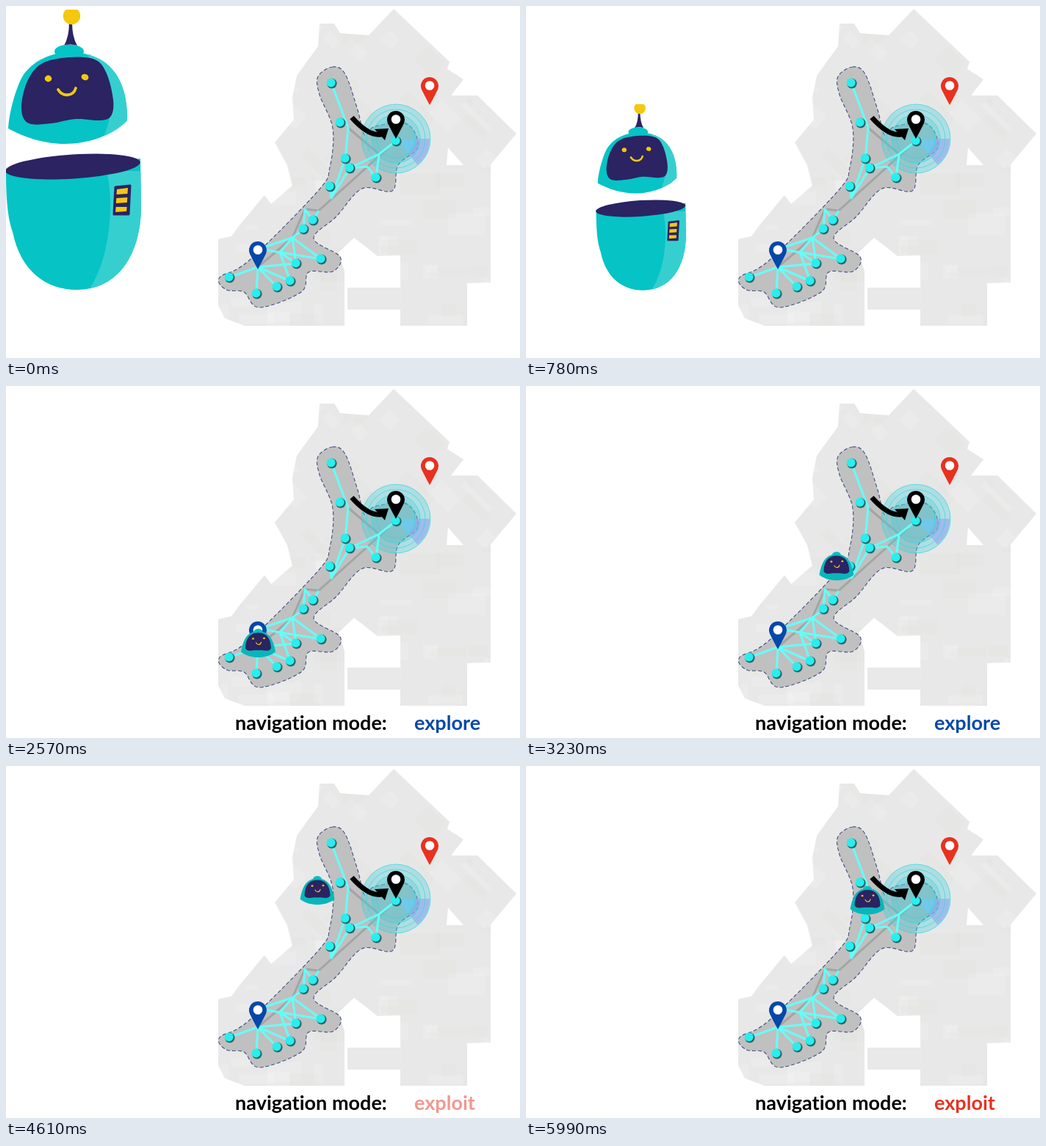
An HTML page with a canvas that plays this animation: 700x480 px, repeating every 8.06 s.

```html
<!DOCTYPE html>
<html lang="en">
<head>
<meta charset="utf-8">
<title>Robot navigation</title>
<style>
html, body { margin: 0; width: 100%; height: 100%; overflow: hidden; background: #fff; }
canvas { display: block; }
</style>
</head>
<body>
<canvas id="stage" width="700" height="480"></canvas>
<script>
const ctx = document.getElementById('stage').getContext('2d');
const LOOP = 8060, TAU = Math.PI * 2;
const TEAL = '#06c3c6', LIGHT = '#36cfd0', NAVY = '#2b2362', YELLOW = '#f3c80f';
const BLUE = '#0648a9', RED = '#e8311f', CYAN = '#66fdf8';

const building = [
  528,4, 604,76, 601,86, 623,100, 606,122, 642,122, 695,174, 660,216, 660,377, 628,378,
  628,436, 537,436, 537,340, 506,341, 474,316, 453,336, 461,362, 461,436, 325,436, 298,426,
  289,408, 289,318, 307,314, 318,299, 352,258, 361,270, 390,245, 383,217, 366,186, 392,155,
  390,125, 396,95, 425,55, 427,24, 447,24, 455,37, 494,40
];
const explored = [
  445,83, 425,96, 427,121, 445,167, 441,220, 425,252, 331,347, 291,370, 300,387, 324,390,
  345,411, 402,390, 412,363, 445,362, 455,342, 419,317, 450,287, 485,249, 526,252, 534,217,
  561,192, 546,161, 503,164, 488,175, 479,142, 462,93
];

// Capitals are stations of the graph, small letters are bare joints
const spots = {
  A: [443, 105], B: [455, 159], C: [462, 208], D: [468, 221], E: [441, 246],
  F: [504, 234], G: [418, 292], H: [405, 304], I: [429, 345], J: [395, 351],
  K: [387, 375], L: [369, 383], M: [341, 392], N: [304, 370], P: [531, 184],
  p: [466, 166], q: [443, 262], r: [492, 219], s: [508, 202], t: [426, 279],
  u: [407, 277], v: [390, 316], w: [373, 336], x: [345, 331], o: [343, 356], y: [520, 194]
};
const trails = ['ovuty', 'ps'];
const links = ['ApCqE', 'qDsP', 'DrFs', 'tGuHvI', 'xvJwK', 'Iwx', 'vw', 'NoM', 'LoK', 'Jo'];

const clamp = x => Math.max(0, Math.min(1, x));
const ramp = (t, a, b) => clamp((t - a) / (b - a));
const ease = x => x * x * (3 - 2 * x);
const mix = (a, b, p) => a + (b - a) * p;

function seeded(seed) {
  return () => (seed = seed * 16807 % 2147483647) / 2147483647;
}

function line(p, close) {
  ctx.beginPath();
  for (let i = 0; i < p.length; i += 2) ctx.lineTo(p[i], p[i + 1]);
  if (close) ctx.closePath();
}

// Closed Catmull-Rom curve through the points
function blob(p) {
  const n = p.length / 2;
  const at = i => { const k = (i + n) % n * 2; return [p[k], p[k + 1]]; };
  ctx.beginPath();
  ctx.moveTo(p[0], p[1]);
  for (let i = 0; i < n; i++) {
    const [a, b, c, d] = [at(i - 1), at(i), at(i + 1), at(i + 2)];
    ctx.bezierCurveTo(b[0] + (c[0] - a[0]) / 6, b[1] + (c[1] - a[1]) / 6,
      c[0] - (d[0] - b[0]) / 6, c[1] - (d[1] - b[1]) / 6, c[0], c[1]);
  }
  ctx.closePath();
}

function fill(color) { ctx.fillStyle = color; ctx.fill(); }

function stroke(color, width) {
  ctx.strokeStyle = color;
  ctx.lineWidth = width;
  ctx.stroke();
}

function oval(x, y, rx, ry, color, turn = 0) {
  ctx.beginPath();
  ctx.ellipse(x, y, rx, ry, turn, 0, TAU);
  fill(color);
}

function pin(x, y, color) {
  ctx.beginPath();
  ctx.arc(x, y, 12, Math.PI * 0.88, Math.PI * 0.12);
  ctx.quadraticCurveTo(x + 7, y + 13, x, y + 26);
  ctx.quadraticCurveTo(x - 7, y + 13, x - 11.2, y + 4.4);
  fill(color);
  oval(x, y - 0.5, 6.3, 6.3, '#fff');
}

function wedge(x, y, r, color) {
  ctx.beginPath();
  ctx.moveTo(x, y);
  ctx.arc(x, y, r, 0, Math.PI * 0.28);
  fill(color);
}

function radar(x, y) {
  oval(x, y, 47, 47, 'rgba(70,205,215,.36)');
  oval(x, y, 33, 33, 'rgba(60,185,195,.22)');
  wedge(x, y, 46, 'rgba(150,165,240,.6)');
  wedge(x, y, 27, 'rgba(70,235,250,.4)');
  for (let r = 47; r > 24; r -= 7) {
    ctx.beginPath();
    ctx.arc(x, y, r, 0, TAU);
    stroke('rgba(50,215,228,.7)', 1);
  }
}

function arrow() {
  ctx.beginPath();
  ctx.moveTo(471, 152);
  ctx.quadraticCurveTo(494, 178, 511, 175);
  stroke('#000', 7);
  line([502,168, 521,167, 516,183], true);
  fill('#000');
}

// Faint rooms: slanted in the upper half, upright in the lower
function rooms() {
  const rand = seeded(41);
  for (let i = 0; i < 90; i++) {
    const x = mix(290, 690, rand()), y = mix(10, 430, rand());
    ctx.save();
    ctx.translate(x, y);
    if (y < 200) ctx.rotate(Math.PI / 4);
    ctx.fillStyle = i % 2 ? 'rgba(255,255,255,.13)' : 'rgba(120,115,105,.025)';
    ctx.fillRect(0, 0, 10 + 45 * rand(), 5 + 25 * rand());
    ctx.restore();
  }
}

function route(names, color, width) {
  line([...names].flatMap(n => spots[n]));
  stroke(color, width);
}

function drawMap() {
  ctx.lineJoin = 'round';
  ctx.fillStyle = '#e9e9e9';
  ctx.fillRect(465, 384, 74, 30);
  line(building, true);
  fill('#e8e8e8');
  ctx.save();
  ctx.clip();
  rooms();
  ctx.restore();
  line([602,193, 623,217, 600,217], true);
  fill('#fff');

  blob(explored);
  fill('#c0c0c0');
  ctx.setLineDash([5, 3]);
  stroke('#405084', 1.1);
  ctx.setLineDash([]);
  for (const names of trails) route(names, '#a4a4a4', 3);
  radar(531, 181);
  for (const names of links) route(names, CYAN, 3);
  for (const [name, [x, y]] of Object.entries(spots)) {
    if (name > 'Z') continue;
    oval(x + 0.8, y + 0.6, 6.8, 6.8, '#23676c');
    oval(x - 0.4, y - 0.5, 6, 6, '#29eeee');
  }
  arrow();
  pin(343, 333, BLUE);
  pin(531, 155, '#000');
  pin(577, 109, RED);
}

function smile(x, y, w, h, width) {
  ctx.beginPath();
  ctx.moveTo(x - w, y);
  ctx.bezierCurveTo(x - w / 2, y + h, x + w * 0.7, y + h, x + w, y - h / 5);
  ctx.lineCap = 'round';
  stroke(YELLOW, width);
  ctx.lineCap = 'butt';
}

// Fills the current path and lights its right side
function shade(x, top, bulge, foot, bottom) {
  fill(TEAL);
  ctx.save();
  ctx.clip();
  ctx.beginPath();
  ctx.moveTo(x, top);
  ctx.bezierCurveTo(bulge, mix(top, bottom, 0.2), bulge, mix(top, bottom, 0.7), foot, bottom);
  ctx.lineTo(200, bottom);
  ctx.lineTo(200, top);
  fill(LIGHT);
  ctx.restore();
}

function head() {
  oval(86, 62, 20, 9.5, TEAL);
  ctx.beginPath();
  ctx.moveTo(3, 167);
  ctx.bezierCurveTo(4, 145, 14, 110, 23, 95);
  ctx.bezierCurveTo(36, 75, 60, 64, 86, 63);
  ctx.bezierCurveTo(137, 63, 166, 95, 165, 156);
  ctx.bezierCurveTo(146, 176, 113, 188, 80, 188);
  ctx.bezierCurveTo(50, 188, 23, 178, 3, 167);
  shade(98, 60, 152, 126, 190);
  blob([21,141, 28,105, 48,79, 85,70, 121,73, 137,92, 146,128, 143,150, 128,156, 95,154, 62,160, 31,160]);
  fill(NAVY);
  oval(57.5, 99, 4.8, 4.4, YELLOW);
  oval(107.5, 97, 5, 4.2, YELLOW, 0.3);
  smile(83, 114, 12, 10, 3.8);
}

function antenna() {
  ctx.beginPath();
  ctx.moveTo(86, 22);
  ctx.quadraticCurveTo(86, 42, 79, 54);
  ctx.quadraticCurveTo(88, 51, 97, 54);
  ctx.quadraticCurveTo(90, 42, 90, 22);
  fill(NAVY);
  ctx.save();
  ctx.beginPath();
  ctx.rect(70, 5, 40, 40);
  ctx.clip();
  oval(89.5, 13.5, 11.7, 11.7, YELLOW);
  ctx.restore();
}

function body() {
  ctx.beginPath();
  ctx.moveTo(0, 222);
  ctx.bezierCurveTo(0, 262, 2, 288, 9, 308);
  ctx.bezierCurveTo(20, 362, 55, 387, 96, 387);
  ctx.bezierCurveTo(152, 387, 184, 340, 184, 272);
  ctx.lineTo(183, 208);
  ctx.lineTo(90, 220);
  shade(137, 225, 146, 111, 390);
  oval(91, 219, 92, 16.5, NAVY, -0.065);
  line([149,247, 169,245, 167,284, 147,284], true);
  fill(NAVY);
  stroke(NAVY, 3);
  for (let i = 0; i < 3; i++) {
    const x = 151 - i * 0.7, y = 250 + i * 12;
    line([x, y, x + 15, y - 2 + i, x + 14.5, y + 6, x - 0.5, y + 7], true);
    fill(YELLOW);
  }
}

function robot() { antenna(); head(); body(); }

// Small explorer centred on the origin
function scout() {
  oval(0, -15, 6, 4.5, TEAL);
  ctx.beginPath();
  ctx.moveTo(-23.5, 12);
  ctx.bezierCurveTo(-20, -8, -13, -16, 0, -16);
  ctx.bezierCurveTo(13, -16, 20, -8, 23.5, 12);
  ctx.bezierCurveTo(12, 22, -12, 22, -23.5, 12);
  fill('#09b6ba');
  ctx.beginPath();
  ctx.moveTo(-17.5, 7);
  ctx.bezierCurveTo(-17, -7, -11, -14, 0, -14);
  ctx.bezierCurveTo(11, -14, 17, -7, 17.5, 7);
  ctx.bezierCurveTo(15, 13, 6, 9, 0, 10);
  ctx.bezierCurveTo(-6, 9, -15, 13, -17.5, 7);
  fill(NAVY);
  oval(-7, -6, 1.5, 1.3, YELLOW);
  oval(8, -6.5, 1.5, 1.3, YELLOW);
  smile(0.5, -0.5, 3.5, 3.5, 1.2);
}

function place(draw, x, y, scale, alpha = 1, cx = 0, cy = 0) {
  ctx.save();
  ctx.globalAlpha = alpha;
  ctx.translate(x, y);
  ctx.scale(scale, scale);
  ctx.translate(-cx, -cy);
  draw();
  ctx.restore();
}

// Slow start, then a nearly even slide
const slide = t => 144 * Math.pow(ease(ramp(t, 0, 1500)), 1.12) / 0.955;

const moves = [
  [2570, 3570, 452, 207], [3570, 4002, 424, 169.5],
  [4750, 5250, 451, 200], [5250, 5990, 465, 183]
];

function scoutAt(t) {
  let x = 343.5, y = 350.5;
  for (const [a, b, tx, ty] of moves) {
    const p = ease(ramp(t, a, b));
    x = mix(x, tx, p);
    y = mix(y, ty, p);
  }
  return [x, y];
}

function label(text, x, color, alpha) {
  ctx.save();
  ctx.globalAlpha = alpha;
  ctx.font = 'bold 27px Lato, "Open Sans", sans-serif';
  ctx.letterSpacing = '0.02px'; // keeps ligatures off
  ctx.fillStyle = color;
  ctx.fillText(text, x, 469);
  ctx.restore();
}

// The picture advances in 60 ms steps with two rests
function step(t) {
  const snap = s => Math.floor(s / 60) * 60;
  return t < 1910 ? Math.min(snap(t), 1320) : Math.min(1910 + snap(t - 1910), 5990);
}

function render(now) {
  const t = step(now % LOOP);
  ctx.fillStyle = '#fff';
  ctx.fillRect(0, 0, 700, 480);
  drawMap();
  if (t < 1320) {
    const d = slide(Math.max(0, t - 60));
    place(robot, 92 + d, 196 + d, 1 - ease(ramp(t, 376, 1416)), 1, 92, 196);
  }
  if (t >= 1910) {
    const shown = ramp(t, 1850, 2400);
    place(scout, ...scoutAt(t), 1, shown);
    label('navigation mode:', 312, '#000', shown);
    label('explore', 556, BLUE, shown * (1 - ramp(t, 3950, 4370)));
    label('exploit', 556, RED, ramp(t, 4370, 4850));
  }
}

const start = performance.now();
function loop() {
  render(performance.now() - start);
  requestAnimationFrame(loop);
}
loop();
</script>
</body>
</html>
```
